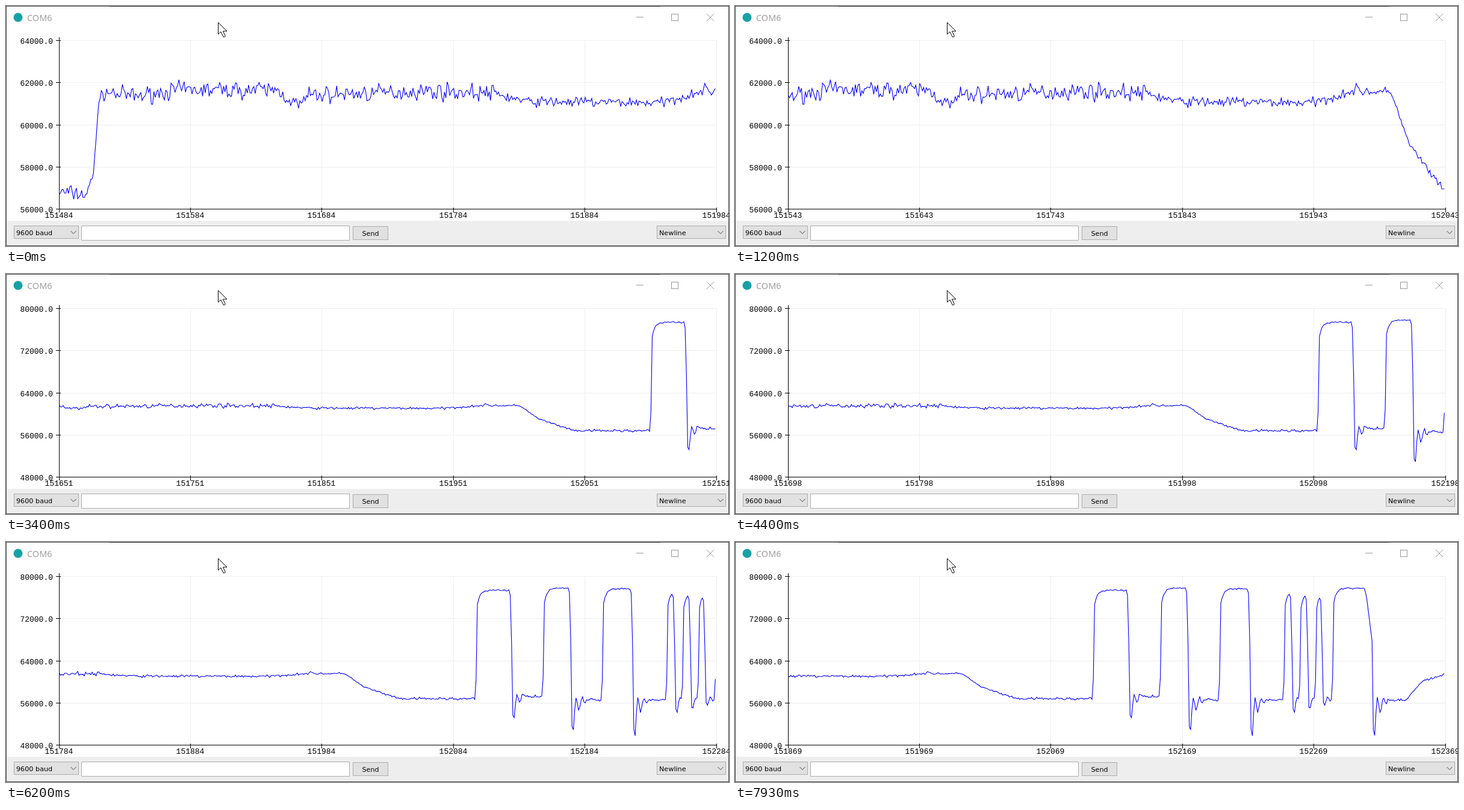
These frames come from a looping animation (1201x400 px, 8 s). An HTML page:

```html
<!DOCTYPE html>
<html lang="en">
<head>
<meta charset="utf-8">
<title>Serial plotter</title>
<style>
  html, body { margin: 0; width: 100%; height: 100%; overflow: hidden; background: #fff; }
  svg { display: block; width: 1201px; height: 400px; }
  text { font: 11.2px "DejaVu Sans", sans-serif; }
  #title { font: 14.5px "Open Sans", "Noto Sans", sans-serif; fill: #999; }
  #plot text { font: 13px "Liberation Mono", monospace; }
  .crisp { shape-rendering: crispEdges; }
  .line { fill: none; stroke: #999; }
</style>
</head>
<body>
<svg viewBox="0 0 1201 400">
  <rect width="1201" height="400" fill="#fff"/>
  <rect y="358" width="1201" height="42" fill="#eee"/>
  <g id="plot"></g>

  <circle cx="20" cy="19" r="7.5" fill="#17a1a5"/>
  <text id="title" x="35" y="25">COM6</text>
  <path class="line crisp" d="M1047 18.5h12M1105.5 13.5h11v11h-11z"/>
  <path class="line" d="M1164 13l12 12M1176 13l-12 12"/>

  <g class="crisp" fill="#e1e1e1" stroke="#adadad">
    <rect x="13.5" y="366.5" width="107" height="21"/>
    <rect x="125.5" y="366.5" width="445" height="24" fill="#fff"/>
    <rect x="576.5" y="367.5" width="58" height="22"/>
    <rect x="1081.5" y="366.5" width="114" height="21"/>
  </g>
  <path class="line" style="stroke:#444" d="M107.5 375l4.500 4.500 4.500-4.500M1182.500 375l4.500 4.500 4.500-4.500"/>
  <text x="17" y="382">9600 baud</text>
  <text x="605.5" y="383" text-anchor="middle">Send</text>
  <text x="1085" y="382">Newline</text>

  <path d="M352.5 27.5V47L357 43L361.5 52L364.5 50.5L360.5 42H367Z" fill="#fff" stroke="#000"/>
  <rect class="crisp" x=".5" y=".5" width="1200" height="399" fill="none" stroke="#4a4a4a"/>
  <path class="crisp" d="M172 .5H1087" stroke="#1a1a1a"/>
</svg>

<script>
const plot = document.getElementById('plot');
const LEFT = 88, RIGHT = 1180, TOP = 57, BOTTOM = 338;
const SPAN = 500, FIRST = 151484, COUNT = 886;
const STEP_X = (RIGHT - LEFT) / SPAN;

// Key points of the resting signal: [sample, value in thousands].
const trend = [
  [0, 56.8], [21, 56.7], [26, 57.7], [30, 61.1], [35, 61.55], [58, 61.35], [90, 61.65],
  [165, 61.65], [182, 60.9], [190, 61.4], [280, 61.6], [330, 61.5], [355, 61.1], [460, 61.05],
  [490, 61.65], [518, 61.5], [531, 59.1], [558, 56.8], [640, 56.8], [650, 57.3], [668, 57.3],
  [690, 56.6], [855, 56.6], [867, 60.1], [885, 61.4]
];

const pulses = [
  { from: 617, to: 643, top: 77.4, dip: 5.5 },
  { from: 668, to: 688, top: 77.8, dip: 8 },
  { from: 713, to: 735, top: 77.7, dip: 9 },
  { from: 762, to: 767, top: 77.3, dip: 3.5 },
  { from: 774, to: 779, top: 77, dip: 2.5 },
  { from: 786, to: 790, top: 76.9, dip: 2 },
  { from: 799, to: 824, top: 77.8, dip: 9, fall: 5 }
];

// How far the plot has scrolled: [picture step, samples].
const scroll = [[0, 0], [30, 99], [51, 167], [93, 300], [119, 385]];

function lerp(points, x) {
  const end = Math.max(1, points.findIndex(p => p[0] > x));
  const i = x >= points.at(-1)[0] ? points.length - 1 : end;
  const [x0, y0] = points[i - 1], [x1, y1] = points[i];
  return y0 + (y1 - y0) * (x - x0) / (x1 - x0);
}

let seed = 7;
function random() {
  seed = seed * 16807 % 2147483647;
  return seed / 2147483647;
}

const noise = amp => (random() + random() + random() - 1.5) * amp;

// Resting value with noise that calms down on steep parts.
function rest(i) {
  const value = lerp(trend, i), slope = Math.abs(lerp(trend, i + 1) - value);
  return value + noise((i < 340 ? .4 : .25) / (1 + 4 * slope));
}

const data = Array.from({ length: COUNT }, (_, i) => rest(i));

// Quick rise, settling top, drop, then a damped ringing below the base.
for (const { from, to, top, dip, fall = 1 } of pulses) {
  data[from] += 3.5;
  for (let i = from + 1; i <= to; i++) {
    const edge = i === to ? .9 : 0;
    data[i] = top - 2.8 * Math.exp((from + 1 - i) / 2) - edge + noise(.15);
  }
  for (let j = 1; j <= fall; j++) data[to + j] = top - 10 * j / fall;
  for (let k = 0; k < 12; k++) {
    const swing = Math.sin(Math.PI * (k + 1.4) / 4.5) ** 2;
    data[to + fall + 1 + k] += .4 - dip * Math.exp(-k / 4.5) * swing;
  }
}

// Smallest round tick size that covers the values with at most four intervals.
function ticks(min, max) {
  for (let unit = 100; ; unit *= 10) {
    for (const m of [1, 2, 4, 5, 8]) {
      const size = m * unit, low = Math.floor(min / size), high = Math.ceil(max / size);
      if (high - low <= 4) return { size, low: low * size, n: high - low };
    }
  }
}

const path = (d, color) => `<path class="crisp" d="${d}" fill="none" stroke="${color}"/>`;
const label = (x, y, anchor, s) => `<text x="${x}" y="${y}" text-anchor="${anchor}">${s}</text>`;

function draw(step) {
  const offset = Math.floor(lerp(scroll, step) + 1e-6);
  const values = data.slice(offset, offset + SPAN).map(v => v * 1000);
  const { size, low, n } = ticks(Math.min(...values), Math.max(...values));
  const toY = v => BOTTOM - (v - low) / (size * n) * (BOTTOM - TOP);
  let grid = '', axes = `M${LEFT + .5} 52V${BOTTOM}M${LEFT} ${BOTTOM + .5}H${RIGHT}`, labels = '';

  for (let i = 0; i <= n; i++) {
    const value = low + i * size, y = Math.round(toY(value));
    if (i) grid += `M${LEFT} ${y + .5}H${RIGHT}`;
    axes += `M83 ${y + .5}h8`;
    labels += label(78, y + 6, 'end', value.toFixed(1));
  }
  for (let i = 0; i <= 5; i++) {
    const x = Math.floor(LEFT + i * 100 * STEP_X);
    if (i) grid += `M${x + .5} ${TOP}V${BOTTOM}`;
    axes += `M${x + .5} 336v8`;
    labels += label(x, 353, 'middle', FIRST + offset + i * 100);
  }
  const line = values.map((v, i) => `${(LEFT + .5 + i * STEP_X).toFixed(2)},${(toY(v) + .5).toFixed(2)}`);
  plot.innerHTML = path(grid, '#eee') + path(axes, '#000') + labels +
    `<polyline points="${line.join(' ')}" fill="none" stroke="#00f" stroke-width="1.1"/>`;
}

let shown = -1;
function frame() {
  const t = performance.now() % 8000, part = t % 200;
  // Three pictures every 200 ms.
  const step = Math.floor(t / 200) * 3 + (part >= 130 ? 2 : part >= 70 ? 1 : 0);
  if (step !== shown) draw(shown = step);
  requestAnimationFrame(frame);
}
frame();
</script>
</body>
</html>
```
